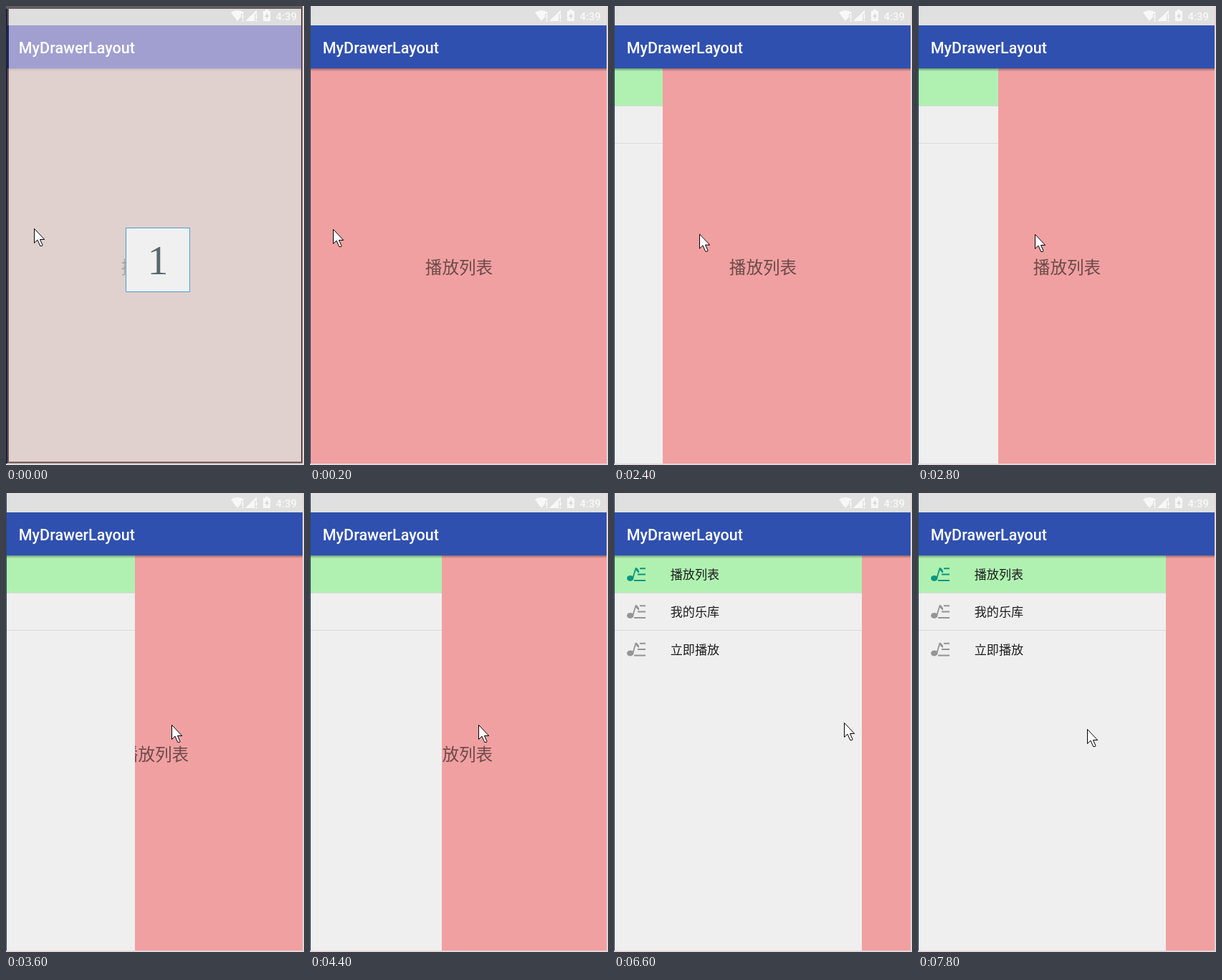
An HTML page for the animation above (8000 ms loop, 416 px wide and 640 px high).

```html
<!DOCTYPE html>
<html lang="zh-CN">
<head>
<meta charset="utf-8">
<title>MyDrawerLayout</title>
<style>
html, body { margin: 0; width: 100%; height: 100%; overflow: hidden; background: #e4d6d8; }
svg { display: block; width: 416px; height: 640px; }
text { font-family: "Noto Sans CJK SC", "Noto Sans CJK", sans-serif; }
.title { font: 500 21.5px Roboto, sans-serif; fill: #fff; }
.clock { font: 500 15px Roboto, sans-serif; fill: #f8f8f8; }
.page { font-size: 23.6px; fill: #6c4a4a; text-anchor: middle; }
.item { font-size: 17.14px; fill: #1c1c1c; }
.count { font: 58px "Liberation Serif", serif; fill: #58676c; text-anchor: middle; }

.intro { animation: intro 8s step-end infinite; }
.drawer { animation: drawer 8s step-end infinite; }
.pointer { animation: pointer 8s step-end infinite; }

@keyframes intro {
  0% { visibility: visible; }
  2.5%, 100% { visibility: hidden; }
}

/* one step every 200 ms */
@keyframes drawer {
  0%, 22.5% { transform: translateX(-346px); }
  25% { transform: translateX(-322px); animation-timing-function: steps(4); }
  35% { transform: translateX(-234px); animation-timing-function: steps(4); }
  45% { transform: translateX(-166px); animation-timing-function: steps(4); }
  55% { transform: translateX(-162px); }
  60% { transform: translateX(-11px); }
  62.5%, 100% { transform: translateX(0); }
}

@keyframes pointer {
  0% { transform: translate(39px, 310px); }
  2.5% { transform: translate(32px, 311px); }
  7.5% { transform: translate(28px, 311px); animation-timing-function: steps(3); }
  15% { transform: translate(1px, 314px); animation-timing-function: steps(2); }
  20% { transform: translate(31px, 316px); }
  22.5% { transform: translate(53px, 317px); animation-timing-function: steps(5); }
  35% { transform: translate(163px, 318px); animation-timing-function: steps(4); }
  45% { transform: translate(231px, 323px); animation-timing-function: steps(4); }
  55% { transform: translate(235px, 323px); }
  60% { transform: translate(235px, 323px); animation-timing-function: steps(2); }
  65% { transform: translate(231px, 317px); animation-timing-function: steps(3); }
  72.5% { transform: translate(217px, 309px); animation-timing-function: steps(3); }
  80% { transform: translate(320px, 319px); }
  82.5% { transform: translate(321px, 320px); animation-timing-function: steps(2); }
  87.5% { transform: translate(340px, 320px); animation-timing-function: steps(3); }
  95% { transform: translate(333px, 321px); }
  97.5%, 100% { transform: translate(236px, 329px); }
}
</style>
</head>
<body>
<svg viewBox="0 0 416 640">
  <defs>
    <linearGradient id="shade" x2="0" y2="1">
      <stop stop-color="#000" stop-opacity=".36"/>
      <stop offset="1" stop-color="#000" stop-opacity="0"/>
    </linearGradient>
    <clipPath id="screen"><path d="M1 87H414V638H1z"/></clipPath>
    <g id="note">
      <ellipse cx="4.7" cy="16" rx="4.7" ry="3.9" fill="currentColor"/>
      <path d="M8.3 15.5 12.6 1.5Q13.2 4.8 16.6 7.2" fill="none" stroke="currentColor" stroke-width="1.8"/>
      <path d="M12.2 1Q17.5 3 17 8.5 14.5 7 12.5 4.5z" fill="currentColor"/>
      <path d="M18 2.2H26M15 10.5H26M10 19H26" stroke="currentColor" stroke-width="2"/>
    </g>
  </defs>

  <!-- app screen -->
  <rect width="414" height="27" fill="#e0e0e0"/>
  <rect y="87" width="414" height="551" fill="#f1a0a1"/>
  <text class="page" x="208" y="372.5">播放列表</text>

  <g clip-path="url(#screen)">
    <g class="drawer">
      <rect x="1" y="87" width="345" height="551" fill="#efefef"/>
      <rect x="1" y="87" width="345" height="52" fill="#b0f1b1"/>
      <path d="M1 139.5H346M1 191.5H346" stroke="#dadada"/>
      <use href="#note" x="18" y="103" color="#08977f"/>
      <use href="#note" x="18" y="155" color="#949494"/>
      <use href="#note" x="18" y="207.500" color="#949494"/>
      <text class="item" x="78.700" y="120">播放列表</text>
      <text class="item" x="78.700" y="172">我的乐库</text>
      <text class="item" x="78.700" y="224.500">立即播放</text>
    </g>
  </g>

  <rect y="27" width="414" height="60" fill="#3050b0"/>
  <rect y="87" width="414" height="4" fill="url(#shade)"/>
  <rect width="1" height="638" fill="#2b4a62"/>

  <!-- faded screen under the countdown -->
  <g class="intro">
    <rect width="416" height="640" fill="#e4dcdc"/>
    <rect width="414" height="27" fill="#dedede"/>
    <rect y="27" width="414" height="60" fill="#a09fd0"/>
    <rect y="87" width="414" height="551" fill="#e0d1cf"/>
    <rect y="87" width="414" height="4" fill="url(#shade)" opacity=".35"/>
    <text class="page" x="208" y="372.5" style="fill:#aca09f">播放列表</text>
    <path d="M0 2H414" stroke="#625c60" stroke-width="4"/>
    <path d="M413 3V636.500H2" fill="none" stroke="#64494c" stroke-width="2"/>
    <path d="M3 4V637" stroke="#6b5458" stroke-width="2"/>
    <path d="M1 4V638" stroke="#1b2140" stroke-width="2"/>
    <path d="M3 27V87" stroke="#20285c" stroke-width="2"/>
    <rect x="167.500" y="309.500" width="89" height="89" fill="#f0f0f0" stroke="#4aa0d8"/>
    <text class="count" x="212" y="374">1</text>
  </g>

  <!-- status bar and title -->
  <g fill="#f8f8f8">
    <path d="M314 9Q323 3 332 9L331 11H328V15L323 21z"/>
    <path d="M329.500 12H331.500V18H329.500zM329.500 19.500H331.500V21.500H329.500z"/>
    <path d="M334 21 350 5.500V11H347V21z"/>
    <path d="M348.500 12H350.500V18H348.500zM348.500 19.500H350.500V21.500H348.500z"/>
    <path d="M359 7H362V5H366V7H369V21H359z"/>
    <path d="M365 9 361 15H363.500V19L367.200 13H365z" fill="#d8d8d8"/>
  </g>
  <text class="clock" x="376.500" y="19.500">4:39</text>
  <text class="title" x="17.800" y="66">MyDrawerLayout</text>

  <g class="pointer">
    <path d="M.5.5V20.500L5 16.200 8.700 24.500H11.500L12 23.300 8.500 15.500H14.700z" fill="#fff" stroke="#000"/>
  </g>
</svg>
</body>
</html>
```
